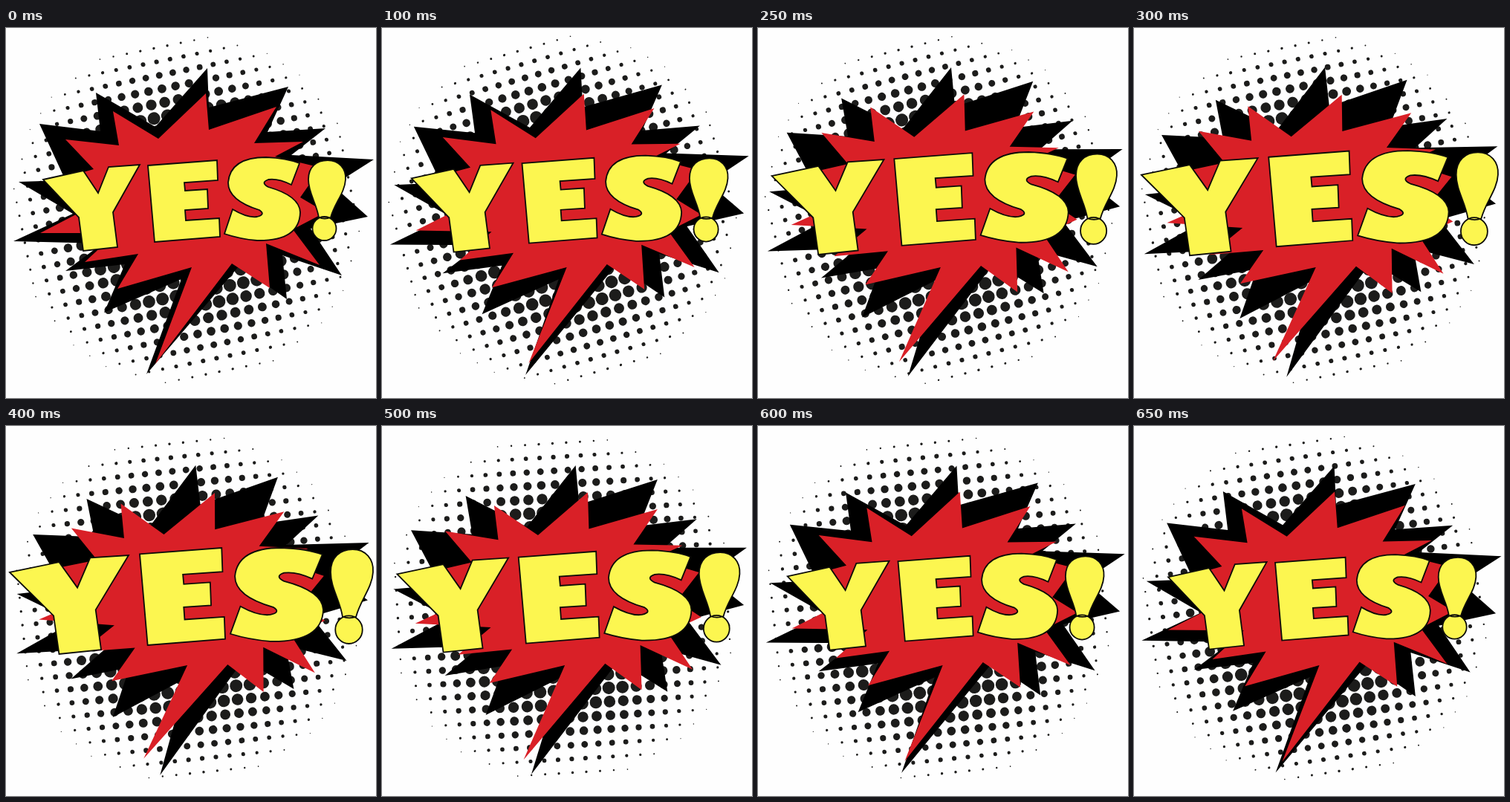
An HTML page with a canvas for the animation above (700 ms loop, 498 px wide and 498 px high).

```html
<!DOCTYPE html>
<html lang="en">
<head>
<meta charset="utf-8">
<title>YES!</title>
<style>
  html, body { margin: 0; width: 100%; height: 100%; overflow: hidden; background: #fefefe; }
  canvas { display: block; width: 498px; height: 498px; }
</style>
</head>
<body>
<canvas id="stage" role="img" aria-label="YES!"></canvas>
<script>
const SIZE = 498, LOOP = 700, STEP = 50;
const canvas = document.getElementById('stage');
const ctx = canvas.getContext('2d');
const dpr = window.devicePixelRatio || 1;
canvas.width = canvas.height = SIZE * dpr;

// Amount of pop at each step of the loop
const pop = [0, .1, .23, .33, .45, .7, .89, .97, 1, .9, .66, .41, .23, .09];

const backBurst = new Path2D(`M271 54 L273 107 380 79 352 140 430 135 384 171
  495 177 440 212 487 254 410 270 452 333 372 306 378 365 314 320 189 466
  236 338 132 383 160 318 80 327 130 290 10 287 90 250 17 207 80 205
  45 129 127 139 121 87 201 133Z`);

const frontBurst = new Path2D(`M269 88 L273 137 364 106 334 155 400 153 362 173
  424 188 396 228 430 248 386 271 422 319 350 290 355 350 304 317 201 452
  250 322 150 351 178 304 106 315 148 276 46 276 96 250 62 206 118 190
  80 150 152 158 144 112 205 149Z`);

// Each letter: outline, resting box and popped box as [left, top, right, bottom]
const letters = [
  { path: new Path2D(`M50 204 L104 192 124 222 138 187 180 184 144 248 150 295
      104 300 98 255Z`),
    from: [50, 184, 180, 300], to: [5, 174, 165, 307] },
  { path: new Path2D(`M191 185 L284 178 285 205 240 208 241 219 271 217 272 243
      241 245 242 259 287 256 288 281 200 288Z`),
    from: [191, 178, 288, 288], to: [180, 164, 295, 295] },
  { path: new Path2D(`M395 182 L384 211 Q366 202 353 204 Q342 208 353 214
      Q395 226 396 248 Q395 287 338 286 Q315 284 294 277 L305 244
      Q325 256 338 254 Q350 251 341 245 Q299 232 299 208 Q302 174 350 174
      Q378 175 395 182Z`),
    from: [294, 174, 396, 287], to: [302, 164, 427, 291] },
  { path: new Path2D(`M407 204 C407 187 418 178 433 178 C448 178 458 189 457 204
      C456 222 442 236 437 255 Q429 258 421 255 C418 236 407 222 407 204Z
      M444.500 270 A16 16 0 1 1 412.500 270 A16 16 0 1 1 444.500 270Z`),
    from: [407, 178, 457, 286], to: [437, 166, 494, 293] }
];

const mix = (a, b, p) => a + (b - a) * p;

function turned(x, y, deg, draw) {
  ctx.save();
  ctx.translate(x, y);
  ctx.rotate(deg * Math.PI / 180);
  draw();
  ctx.restore();
}

function halftone() {
  const gap = 18.5, reach = 238;
  ctx.fillStyle = '#1c1c1b';
  ctx.beginPath();
  for (let i = -13; i <= 13; i++) {
    for (let j = -13; j <= 13; j++) {
      const x = i * gap, y = j * gap, d = Math.hypot(x, y);
      if (d > reach) continue;
      const r = Math.min(8.5, (245 - d) * .075);
      ctx.moveTo(x + r, y);
      ctx.arc(x, y, r, 0, Math.PI * 2);
    }
  }
  ctx.fill();
}

function burst(path, color, deg) {
  turned(248, 245, deg, () => {
    ctx.translate(-248, -245);
    ctx.fillStyle = color;
    ctx.fill(path);
  });
}

function letter({ path, from, to }, p) {
  const [l, t, r, b] = from.map((v, i) => mix(v, to[i], p));
  const sx = (r - l) / (from[2] - from[0]);
  const sy = (b - t) / (from[3] - from[1]);
  const shape = new Path2D();
  shape.addPath(path, new DOMMatrix([sx, 0, 0, sy, l - from[0] * sx, t - from[1] * sy]));
  ctx.fillStyle = '#fcf650';
  ctx.fill(shape);
  ctx.strokeStyle = '#0c0c08';
  ctx.lineWidth = 1.8;
  ctx.stroke(shape);
}

function render(time) {
  const step = Math.floor(time % LOOP / STEP);
  const p = pop[step];
  const sway = -10 - 6.5 * Math.cos((step * STEP - 150) / LOOP * Math.PI * 2);
  ctx.setTransform(dpr, 0, 0, dpr, 0, 0);
  ctx.fillStyle = '#fefefe';
  ctx.fillRect(0, 0, SIZE, SIZE);
  turned(243, 245, sway, halftone);
  burst(backBurst, '#000', -4.7 * p);
  burst(frontBurst, '#d92027', 4.4 * p);
  letters.forEach(item => letter(item, p));
}

const start = performance.now();
function tick() {
  render(performance.now() - start);
  requestAnimationFrame(tick);
}
tick();
</script>
</body>
</html>
```
